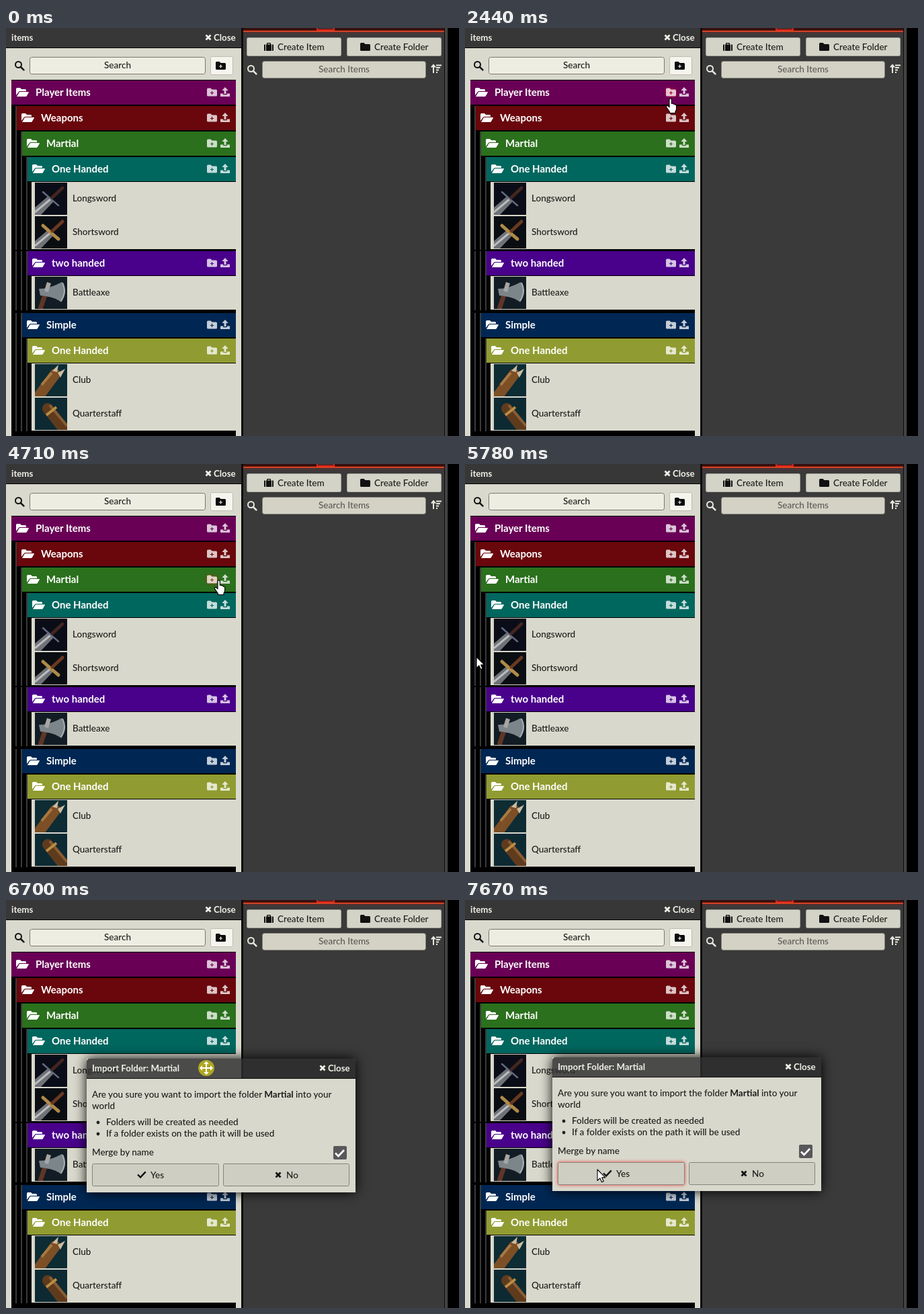
Write an HTML page that moves like this. It is 674x607 px and loops after 8 s.

```html
<!DOCTYPE html>
<html lang="en">
<head>
<meta charset="utf-8">
<title>Import folder</title>
<style>
html, body { margin: 0; width: 100%; height: 100%; overflow: hidden; background: #000; }
svg { display: block; width: 674px; height: 607px; }
text { font: 500 13.5px Lato, "Open Sans", sans-serif; fill: #1c1c1a; white-space: pre; }
.b { font-weight: 700; font-size: 13.3px; fill: #f0efe8; }
.row { font-weight: 700; font-size: 15px; fill: #fff; }
.tip { font: 11.5px "Open Sans", sans-serif; fill: #dedede; }
.mid { text-anchor: middle; }
.glow { filter: drop-shadow(0 0 2.5px #ff0000b0); }
.halo { filter: drop-shadow(0 0 9px #000); }
</style>
</head>
<body>
<svg id="stage" viewBox="0 0 674 607" xmlns="http://www.w3.org/2000/svg"></svg>
<script>
const LOOP = 8000;

const ICONS = {
  folder: 'M0 1.5Q0 0 1.5 0H5.5L7.5 2H13.5Q15 2 15 3.5V10.5Q15 12 13.5 12H1.5Q0 12 0 10.5Z',
  open: 'M0 11V1.5Q0 0 1.5 0H6L8 2H13.5Q15 2 15 3.5V5H5.5Q4.3 5 3.6 6.2Z' +
        'M1 13L4.6 6.8Q5 6 6 6H18.2Q19.4 6 18.8 7L15.8 12.2Q15.3 13 14.4 13Z',
  upload: 'M5.5 10V5H2.3L7 0L11.7 5H8.5V10ZM0 9.5H4.2V11.2H9.8V9.5H14V14H0Z',
  suitcase: 'M0 3.5Q0 2.5 1 2.5H2V12H1Q0 12 0 11ZM3 2.5H4V1Q4 0 5 0H9Q10 0 10 1V2.5H11V12H3ZM5.3 1.3V2.5H8.7V1.3Z' +
            'M12 2.5H13Q14 2.5 14 3.5V11Q14 12 13 12H12Z',
  arrow: 'M0 0V16.5L3.9 12.9L6.5 18.6L9.2 17.4L6.7 11.9H11.8Z',
  hand: 'M-2 1.5Q-2 0 -.4 0Q1.3 0 1.3 1.5V7.5Q3.8 6.6 4.2 8.3Q6.2 7.6 6.6 9.4Q8.6 8.9 8.6 11V15Q8.6 17.5 7 19V21.5H-1.5' +
        'V19.5Q-4.5 16 -6.6 12.4Q-7 10.4 -5 10.4Q-3.5 10.8 -2 13Z'
};
ICONS.plus = ICONS.folder + 'M6.9 4.4h1.2v2h2v1.2h-2v2h-1.2v-2h-2v-1.2h2z';

const rect = (x, y, w, h, fill, more = '') =>
  `<rect x="${x}" y="${y}" width="${w}" height="${h}" fill="${fill}" ${more}/>`;
const text = (x, y, str, cls = '', more = '') => `<text x="${x}" y="${y}" class="${cls}" ${more}>${str}</text>`;
const icon = (name, x, y, fill, id = '') =>
  `<g ${id && `id="${id}"`}><path transform="translate(${x} ${y})" d="${ICONS[name]}" fill="${fill}" fill-rule="evenodd"/></g>`;
const line = (d, color, width, cap = 'butt') =>
  `<path d="${d}" fill="none" stroke="${color}" stroke-width="${width}" stroke-linecap="${cap}"/>`;
const cross = (x, y, color) => line(`M${x + 1.5} ${y + 1.5}l7 7m0 -7l-7 7`, color, 2.8);
const check = (x, y, color, k = 1) => line(`M${x} ${y + 5 * k}l${4.5 * k} ${4.5 * k}l${8.5 * k} ${-9 * k}`, color, 2.7 * k);
const lens = (x, y, color) =>
  `<circle cx="${x}" cy="${y}" r="4.5" fill="none" stroke="${color}" stroke-width="2"/>` +
  line(`M${x + 3.3} ${y + 3.3}l4.6 4.6`, color, 2.6, 'round');
const closeLabel = (x, y) => cross(x, y, '#f0efe8') + text(x + 13, y + 10, 'Close', 'b');
const button = (x, y, w, id = '') =>
  rect(x + .5, y + .5, w - 1, 33, '#cfcec2', `stroke="#85847b" rx="2" ${id && `id="${id}"`}`);

// Item pictures, drawn in a 48 px square
const sword = (guard, grip, width) =>
  '<path d="M0 37L20 20L28 28L9 48H0Z" fill="#6f7277"/>' + line('M0 44L24 24', '#b9bbbd', 3) +
  line('M12 14Q22 23 35 34', guard, width, 'round') + line('M26 22L41 8', grip, 5, 'round');
const ART = {
  Longsword: ['#0a0d18', sword('#626a82', '#43261f', 2.5)],
  Shortsword: ['#0a0e12', sword('#b08a48', '#6b3822', 5)],
  Battleaxe: ['#111c25',
    line('M8 48L21 9', '#5f3626', 7) + '<path d="M6 18Q22 18 40 8Q50 22 39 38Q30 30 8 28Z" fill="#7c8589"/>' +
    line('M41 9Q48 22 39 36', '#a9b0b2', 2) + line('M17 22l4 -13', '#a5a7a7', 6)],
  Club: ['#0d2c34',
    line('M7 46L30 15', '#7d4f26', 16, 'round') + line('M10 31L25 13', '#a87840', 4) +
    '<path d="M26 10L35 1L33 12ZM34 13L45 7L38 20Z" fill="#c9bda4"/>'],
  Quarterstaff: ['#0d2a33',
    line('M19 16L44 48', '#5f3b1e', 16, 'round') + line('M22 11L48 42', '#8a5c31', 4) + line('M17 26L32 14', '#b98d45', 4)]
};

// [depth, name, colour]; entries without a colour are items
const TREE = [
  [0, 'Player Items', '#690056'], [1, 'Weapons', '#69070c'], [2, 'Martial', '#2b701d'],
  [3, 'One Handed', '#00675f'], [4, 'Longsword'], [4, 'Shortsword'],
  [3, 'two handed', '#49008b'], [4, 'Battleaxe'],
  [2, 'Simple', '#002753'], [3, 'One Handed', '#909c31'], [4, 'Club'], [4, 'Quarterstaff']
];
const zones = [];   // what reacts to the pointer: id and box

const folderRow = (x, y, name, color, i) => {
  zones.push({ id: 'plus' + i, x: 296, y: y + 7, w: 20, h: 22, hand: true });
  zones.push({ id: 'up' + i, x: 316, y: y + 6, w: 20, h: 22, hand: true });
  return rect(x, y, 342 - x, 36, color) + icon('open', x + 7, y + 11, '#fff') + text(x + 36, y + 23, name, 'row') +
    icon('plus', 299, y + 11.5, '#ffffffc4', 'plus' + i) + icon('upload', 319, y + 10, '#ffffffc4', 'up' + i);
};

const itemRow = (y, name) =>
  rect(38, y, 304, 50, '#d9d8cc') +
  `<svg x="43" y="${y + 1}" width="48" height="48">${rect(0, 0, 48, 48, ART[name][0])}${ART[name][1]}</svg>` +
  text(99, y + 29, name);

function tree() {
  let y = 78, out = '', last = null;
  TREE.forEach(([depth, name, color], i) => {
    const item = !color;
    if (item && last === 'folder') y -= 1;
    if (!item && last === 'item') y += 3 + 2 * (3 - depth);
    for (let d = 1; d <= Math.min(depth, 3); d++) out += rect(6 + 8 * d, y, 2, item ? 51 : 38, '#3b3b3b');
    out += item ? itemRow(y, name) : folderRow(8 + 8 * depth, y, name, color, i);
    y += item ? 50 : 38;
    last = item ? 'item' : 'folder';
  });
  return rect(8, 77, 334, 530, '#000') + out;
}

const panel = () =>
  rect(0, 0, 350, 607, '#dad9ce') + rect(0, 0, 350, 29, '#373737') + rect(0, 29, 350, 1, '#000') +
  text(8, 19, 'items', 'b') + closeLabel(296, 9) + lens(18.5, 54.5, '#111') +
  rect(35.5, 43.5, 261, 25, '#eeede1', 'stroke="#7a7971" rx="3"') + text(166, 60, 'Search', 'mid') +
  rect(304.5, 42.5, 33, 27, '#f5f4ed', 'id="rootBtn" stroke="#bdbcb1" rx="2"') + icon('plus', 312, 50, '#0b0b0b') + tree();

const sidebar = () =>
  rect(350, 0, 308, 607, '#0c0c0c') + rect(353, 0, 299, 607, '#3a3a3a') + rect(653, 0, 4, 607, '#434343') +
  `<svg x="353" width="299" height="12">${rect(0, 0, 299, 4, '#2a1311')}${rect(110, -2, 25, 5, '#45302e', 'stroke="#d8241c" stroke-width="2"')}` +
  rect(-9, 4, 320, 1.5, '#ff4a20', 'class="glow"') + '</svg>' +
  [358, 507].map(x => rect(x + .5, 14.5, 140, 27, '#d4d3c7', 'stroke="#a4a39a" rx="2"')).join('') +
  icon('suitcase', 384, 22, '#111') + text(404, 33, 'Create Item') +
  icon('folder', 527, 22, '#111') + text(548, 33, 'Create Folder') +
  lens(364.5, 60.5, '#e8e7df') + rect(381.5, 49.5, 243, 25, '#d3d2c5', 'stroke="#85847c" rx="3"') +
  text(503, 66, 'Search Items', 'mid', 'style="fill:#5b5a54"') +
  line('M636 67V56m-3 2.5l3 -3.5l3 3.5', '#e8e7df', 2) +
  [0, 1, 2, 3].map(i => rect(640, 54.5 + i * 3.5, 8 - 2 * i, 2, '#e8e7df')).join('');

const bullet = (y, s) => `<circle cx="17" cy="${y - 4}" r="2.4" fill="#222"/>` + text(29, y, s);
const dialog = () =>
  `<g id="dialog"><g clip-path="url(#outside)">${rect(0, 0, 400, 199, '#000', 'class="halo" rx="5"')}</g>` +
  rect(0, 29, 400, 170, '#d9d8cc') + '<path d="M0 29V5Q0 0 5 0H395Q400 0 400 5V29Z" fill="#2e2e2dd2"/>' +
  rect(0, 29, 400, 1, '#111') + text(8, 19, 'Import Folder: Martial', 'b') + closeLabel(346, 9) +
  text(8, 58, 'Are you sure you want to import the folder <tspan font-weight="700">Martial</tspan> into your') +
  text(8, 75, 'world') + bullet(99, 'Folders will be created as needed') +
  bullet(116, 'If a folder exists on the path it will be used') +
  text(8, 144, 'Merge by name') + rect(367, 130, 20, 20, '#58585a', 'rx="2"') + check(370, 135.5, '#fff') +
  button(8, 156, 189, 'yesBtn') + check(76, 168, '#111', .9) + text(95, 178, 'Yes') +
  button(203, 156, 188) + cross(280, 168, '#111') + text(297, 178, 'No') + '</g>';

const tooltip = (id, x, y, w, s) =>
  `<g id="${id}">${rect(x + .5, y + .5, w - 1, 24, '#1b1c20', 'stroke="#6c6c70"')}${text(x + 8, y + 17, s, 'tip')}</g>`;

const pointer = name =>
  `<path id="${name}" d="${ICONS[name]}" fill="#fff" stroke="#000" stroke-width="1.1" stroke-linejoin="round"/>`;
const moveMark = () =>
  '<g id="move"><circle r="12" fill="#b9b01d" fill-opacity=".9"/>' + line('M-8 0H8M0 -8V8', '#fff', 2) +
  [0, 90, 180, 270].map(a => `<path d="M10 0L6 -4V4Z" fill="#fff" transform="rotate(${a})"/>`).join('') + '</g>';

document.getElementById('stage').innerHTML =
  '<clipPath id="outside"><path clip-rule="evenodd" d="M-40 -40H440V240H-40ZM0 0V199H400V0Z"/></clipPath>' +
  sidebar() + panel() + dialog() +
  tooltip('tipRoot', 332, 74, 129, 'Create Folder at Root') + tooltip('tipSub', 312, 114, 106, 'Create Subfolder') +
  `<g id="cursor">${pointer('arrow')}${pointer('hand')}${moveMark()}</g>`;

zones.push({ id: 'rootBtn', x: 304, y: 42, w: 34, h: 28 });
zones.push({ id: 'yesBtn', x: 138, y: 390, w: 189, h: 34, dialog: true });

// Each trip: start, end, number of pictures, ease-out power, then from, bend, to
const POINTER_TRIPS = [
  [160, 850, 16, 3, [596, 592], [400, 180], [322, 59]],
  [2110, 2540, 10, 1, [320, 64], [306, 122], [302, 98]],
  [3690, 4480, 15, 1, [301, 118], [236, 262], [243, 205]],
  [4530, 5220, 14, 3, [232, 198], [347, 164], [326, 171]],
  [5550, 5810, 7, 1, [300, 192], [130, 250], [-40, 305]],
  [6420, 6700, 7, 1, [-20, 305], [150, 258], [298, 250]],
  [6760, 7210, 10, 1, [306, 245], [296, 243], [308, 248]],
  [7260, 7670, 10, 2, [302, 264], [215, 380], [197, 401]]
];
const DIALOG_TRIPS = [
  [6420, 6700, 7, 1, [-330, 326], [-90, 259], [120, 236]],
  [6760, 7210, 10, 1, [128, 230], [118, 226], [130, 234]]
];

function locate(trips, t) {
  const trip = trips.filter(k => k[0] <= t).pop();
  if (!trip) return [-450, 0];
  const [start, end, count, power, a, b, c] = trip;
  const steps = count - 1;
  const p = Math.min(steps, Math.floor((t - start) / (end - start) * steps + .001)) / steps;
  const u = 1 - (1 - p) ** power;
  return [0, 1].map(n => (1 - u) ** 2 * a[n] + 2 * u * (1 - u) * b[n] + u * u * c[n]);
}

const $ = id => document.getElementById(id);
const show = (id, on) => { $(id).style.display = on ? '' : 'none'; };
const place = (id, [x, y]) => $(id).setAttribute('transform', `translate(${Math.round(x)} ${Math.round(y)})`);
const within = (t, a, b) => t >= a && t < b;
const over = (z, [x, y], t) =>
  within(x, z.x, z.x + z.w) && within(y, z.y, z.y + z.h) && (!z.dialog || t > 7260);

function draw(t) {
  const spot = locate(POINTER_TRIPS, t);
  const lagged = locate(POINTER_TRIPS, t - 60);   // the glow trails the pointer
  place('cursor', spot);
  place('dialog', locate(DIALOG_TRIPS, t));

  const moving = within(t, 6420, 7260);
  const hand = !moving && zones.some(z => z.hand && over(z, spot, t));
  show('move', moving);
  show('hand', hand);
  show('arrow', !moving && !hand);
  show('tipRoot', within(t, 1280, 2110));
  show('tipSub', within(t, 3000, 3690));
  for (const z of zones) $(z.id).setAttribute('class', over(z, lagged, t) ? 'glow' : '');
}

const born = performance.now();
function frame() {
  draw((performance.now() - born) % LOOP);
  requestAnimationFrame(frame);
}
frame();
</script>
</body>
</html>
```
